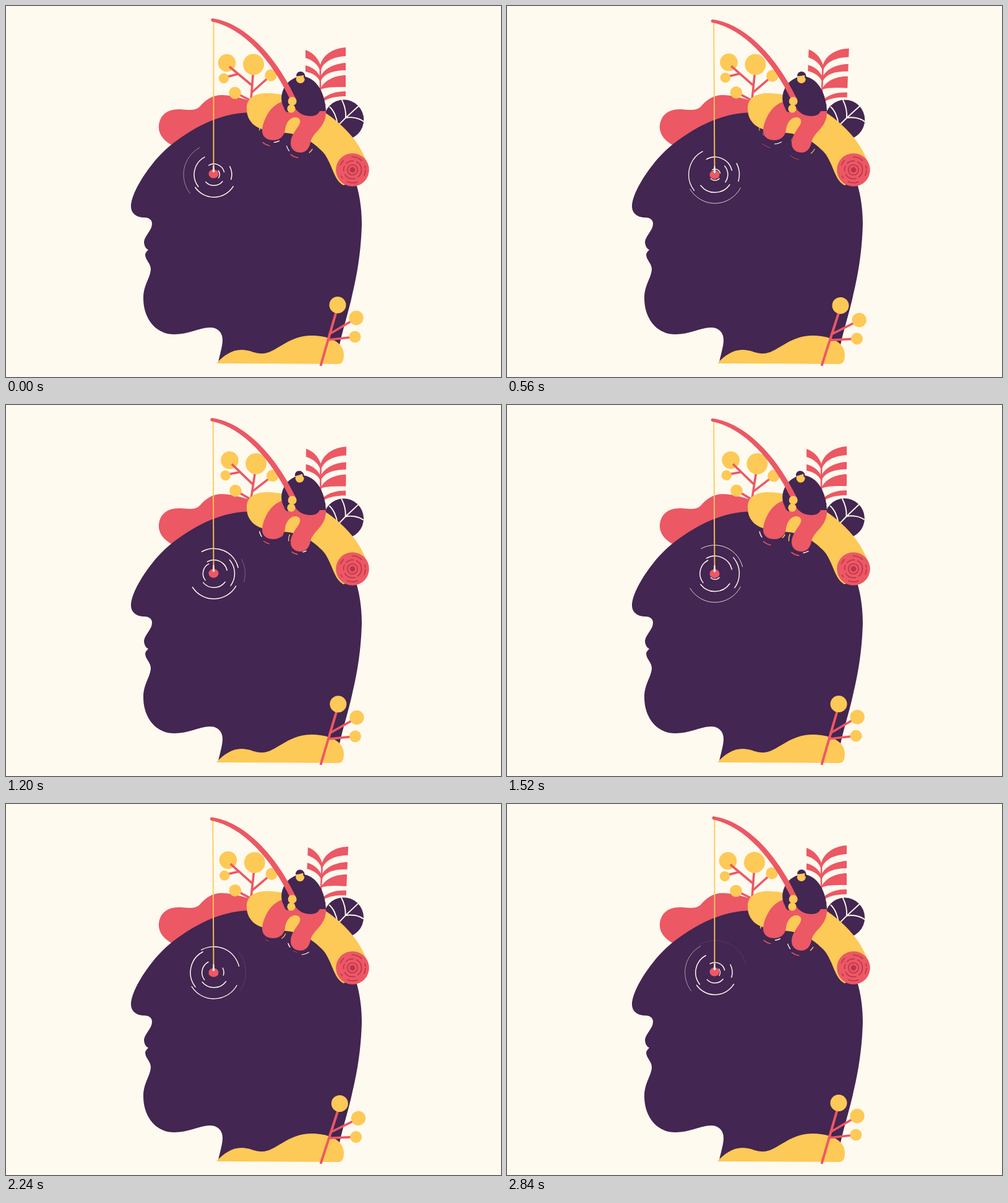
An HTML page for the animation above (2.88 s loop, 800 px wide and 600 px high).

```html
<!DOCTYPE html>
<html lang="en">
<head>
<meta charset="utf-8">
<title>Fishing for thoughts</title>
<style>
html, body { margin: 0; width: 100%; height: 100%; overflow: hidden; background: #fffaef; }
svg { display: block; width: 100vw; height: 100vh; }
.p { fill: #432651; } .r { fill: #ec5864; } .y { fill: #fdc957; }
.stem { fill: none; stroke: #ec5864; stroke-width: 3.6; }
.vein { fill: none; stroke: #fffaef; stroke-width: 1.9; }
.grain { fill: none; stroke: #b9344c; stroke-width: 1.6; }
</style>
</head>
<body>
<svg viewBox="0 0 800 600">
  <g id="fern">
    <path class="stem" style="stroke-width:2.6" d="M508 95V140C508 149 511 155 516 161"/>
    <path class="r" d="M484 71C496 75 504 84 508 95C512 80 528 68 549 67V81C530 82 514 89 509 103H507C503 93 494 87 484 84Z"/>
    <path class="r" d="M484 96C496 99 504 106 508 115C513 102 530 93 549 92V104C530 104 514 109 509 121H507C503 113 494 108 484 106Z"/>
    <path class="r" d="M508 135C512 122 530 112 549 112V131C530 131 518 131 508 135Z"/>
    <path class="r" d="M511 151C522 141 535 138 549 138V146C535 146 523 148 513 154Z"/>
  </g>
  <path class="r" d="M268 225C252 216 246 205 247 193C249 175 262 167 280 167C296 168 305 170 313 163C322 152 333 144 349 144C372 145 385 151 405 156V200Z"/>
  <g id="bush">
    <circle class="y" cx="357" cy="92" r="14.3"/>
    <path class="stem" d="M396 152L400 100M397 128L361 98M375 110L352 116M397 140L428 112M394 152L370 140"/>
    <circle class="y" cx="400" cy="94.5" r="17"/>
    <circle class="y" cx="352" cy="117" r="8.2"/>
    <circle class="y" cx="428" cy="112" r="9.7"/>
    <circle class="y" cx="370" cy="140.5" r="9.8"/>
  </g>
  <path class="p" d="M343 576C346 562 350 550 350 540C350 526 340 519 328 520C310 521 295 531 272 531C240 531 221 503 222 470C223 450 233 440 234 426C234 416 226 412 225 403C225 398 229 396 230 394C226 393 223 387 223 381C225 370 236 363 236 352C236 345 230 342 223 342C212 342 202 336 202 324C202 300 236 248 270 222C310 192 350 172 400 172C480 172 530 215 560 270C572 300 575 330 575 352C574 400 566 440 560 465C555 490 545 520 539 548L540 576Z"/>
  <g id="leaf">
    <circle class="p" cx="546" cy="184" r="32.3"/>
    <path class="vein" d="M532 198L549 181L570 162M549 181C550 170 547 160 543 152M549 181C558 179 570 181 578 187M536 193C535 180 529 168 523 163"/>
  </g>
  <path class="y" d="M389 165C389 149 402 140 425 141C490 143 562 195 582 250L586 262L546 290C528 282 527 250 510 234C490 214 470 206 448 205C425 204 403 199 395 186C390 179 389 172 389 165Z"/>
  <circle class="r" cx="560" cy="265" r="26.8"/>
  <circle cx="560" cy="265" r="4.4" fill="#b9344c"/>
  <circle class="grain" cx="560" cy="265" r="8.3"/>
  <circle class="grain" cx="560" cy="265" r="14.5" stroke-dasharray="14 4 20 5 9 4"/>
  <circle class="grain" cx="560" cy="265" r="21" stroke-dasharray="10 14 18 9 5 17"/>
  <g id="pond" fill="none"></g>
  <path class="r" d="M448 154C436 158 427 166 421 178C416 188 414 195 414 203C415 213 423 217 432 217C443 217 450 210 451 200C452 189 460 179 468 180C477 181 477 188 472 195C466 204 460 212 460 222C460 231 467 237 476 237C485 237 490 230 492 221C494 204 517 198 517 172L515 160L470 163Z"/>
  <path class="p" d="M449 164C443 153 444 140 452 128C460 118 471 113 481 114C501 116 516 140 517 170L507 170C504 176 499 178 492 178C482 178 473 174 467 165L455 172C452 171 450 168 449 164Z"/>
  <g id="face">
    <circle class="y" cx="475.8" cy="118" r="7"/>
    <path class="p" d="M469 113.500C469 109 472 106 476 106C480 106 484.500 109 483.500 117.500L481.500 117L481 112C477 113 473 113 469 113.500Z"/>
  </g>
  <path id="line" fill="none" stroke="#fdc957" stroke-width="1.8"/>
  <g id="rod" class="r">
    <circle cx="334" cy="22.600" r="2.600"/>
    <path d="M334 20C388 28 438 84 468 149L460 153C430 88 384 36 333.500 25.200Z"/>
  </g>
  <circle class="y" cx="462.700" cy="154" r="7"/>
  <circle class="y" cx="461" cy="166" r="6.600"/>
  <g id="float">
    <ellipse class="r" cx="335.500" cy="271.500" rx="8" ry="7.200"/>
    <path d="M334.600 258H336.400L337.200 268Q335.500 270 333.800 268Z" fill="#fffaef"/>
  </g>
  <path class="y" d="M340 578C352 565 365 556 381 556C398 557 400 562 414 562C436 562 454 534 492 533C525 533 546 545 546 564C546 574 543 579 537 579Z"/>
  <g id="sprig">
    <path class="stem" style="stroke-width:4" d="M508.500 582L535 490"/>
    <g class="twig">
      <path class="stem" d="M522 531L566 505"/>
      <circle class="y" cx="566" cy="504.500" r="11.700"/>
    </g>
    <g class="twig">
      <path class="stem" d="M520 540L564 535"/>
      <circle class="y" cx="564" cy="535" r="9.500"/>
    </g>
    <circle class="y" cx="536" cy="483.500" r="13.500"/>
  </g>
</svg>
<script>
const LOOP = 2880;
const WHITE = '#fffaef', RED = '#ec5864', YELLOW = '#fdc957';
const $ = id => document.getElementById(id);
const twigs = document.querySelectorAll('.twig');
const pond = $('pond');

const clamp = v => Math.max(0, Math.min(1, v));
const smooth = v => { v = clamp(v); return v * v * (3 - 2 * v); };
const wave = (t, period, shift = 0) => 0.5 - 0.5 * Math.cos(2 * Math.PI * (t - shift) / period);
const age = (t, birth) => (t - birth + 2 * LOOP) % LOOP;
const turn = (el, deg, x, y) => el.setAttribute('transform', `rotate(${deg.toFixed(3)} ${x} ${y})`);

function arc(x, y, r, from, to) {
  const at = deg => {
    const a = deg * Math.PI / 180;
    return (x + r * Math.cos(a)).toFixed(2) + ' ' + (y + r * Math.sin(a)).toFixed(2);
  };
  return `M${at(from)}A${r} ${r} 0 0 1 ${at(to)}`;
}

function stroke(color) {
  const el = document.createElementNS('http://www.w3.org/2000/svg', 'path');
  el.setAttribute('stroke', color);
  el.setAttribute('stroke-linecap', 'round');
  return pond.appendChild(el);
}

// Arcs spreading from the float: birth, start angle, end angle, widening
const rings = [
  [100, 31, 146, 0.4], [1060, 31, 146, 0.4], [2020, 31, 146, 0.4],
  [350, 142, 242, 0], [1310, 142, 242, 0],
  [140, -119, -14, 0], [2060, -119, -14, 0],
  [1470, -27, 16, 0], [2430, -41, 36, 0]
].map(([birth, from, to, widen]) => ({ birth, from, to, widen, el: stroke(WHITE) }));

// Dashes around the feet: foot, color, birth, angles, first radius, growth
const dashes = [
  [0, RED, 750, 103, 130, 23, 8],
  [0, RED, 2190, 103, 130, 23, 8],
  [0, WHITE, 2380, 60, 88, 18, 7],
  [0, WHITE, 530, 146, 168, 19.5, 7],
  [0, YELLOW, 2300, 177, 195, 20.3, 5],
  [0, YELLOW, 1150, 27, 51, 18.5, 5],
  [1, RED, 750, 99, 128, 21.5, 9],
  [1, RED, 2190, 99, 128, 21.5, 9],
  [1, WHITE, 1800, 142, 164, 19.6, 5],
  [1, YELLOW, 530, 174, 205, 16.5, 6],
  [1, YELLOW, 2350, 30, 51, 20, 6],
  [1, WHITE, 1100, 57, 85, 20, 6]
].map(([foot, color, birth, from, to, r, grow]) =>
  ({ foot, birth, from, to, r, grow, el: stroke(color) }));

function drawRing({ birth, from, to, widen, el }, t) {
  const a = age(t, birth);
  const r = Math.max(0.1, 0.0209 * a - 2.3e-10 * a ** 3);
  const spread = (r - 38) * widen;
  el.setAttribute('d', arc(336, 272.5, r, from - spread, to + spread));
  el.setAttribute('stroke-width', 1.5 * clamp((2750 - a) / 700) * clamp(a / 450));
}

function drawDash({ foot, birth, from, to, r, grow, el }, t) {
  const u = age(t, birth) / 1440;
  const fade = clamp((1.03 - u) / 0.35);
  const inset = (to - from) * 0.25 * clamp(1 - u / 0.5);
  const y = foot ? 220 - 2.4 * wave(t, LOOP) : 200;
  el.setAttribute('d', arc(foot ? 476 : 432, y, r + grow * Math.min(u, 1), from + inset, to - inset));
  el.setAttribute('stroke-width', 1.5 * fade * clamp(u / 0.08));
}

function draw(t) {
  const sway = wave(t, 1440);
  turn($('fern'), 2.6 * sway, 506, 162);
  turn($('sprig'), 2 * sway, 509, 582);
  turn(twigs[0], 2.3 * sway, 522, 531);
  turn(twigs[1], 2 * sway, 520, 540);
  turn($('bush'), 4.4 * wave(t, LOOP), 396, 152);
  turn($('leaf'), -1.6 * wave(t, LOOP, 360), 520, 200);

  const nod = smooth((t - 560) / 280) - smooth((t - 2060) / 340);
  turn($('face'), -10 * nod, 477.5, 125);

  const dip = wave(t, 960, -20);
  turn($('rod'), -0.82 * dip, 463, 151);
  $('line').setAttribute('d', `M${335.5 - 1.5 * dip} ${23 + 1.8 * dip}L335.500 ${260 + 1.5 * dip}`);
  $('float').setAttribute('transform', `translate(0 ${1.4 * dip})`);

  rings.forEach(ring => drawRing(ring, t));
  dashes.forEach(dash => drawDash(dash, t));
}

const start = performance.now();
function tick() {
  draw((performance.now() - start) % LOOP);
  requestAnimationFrame(tick);
}
tick();
</script>
</body>
</html>
```
